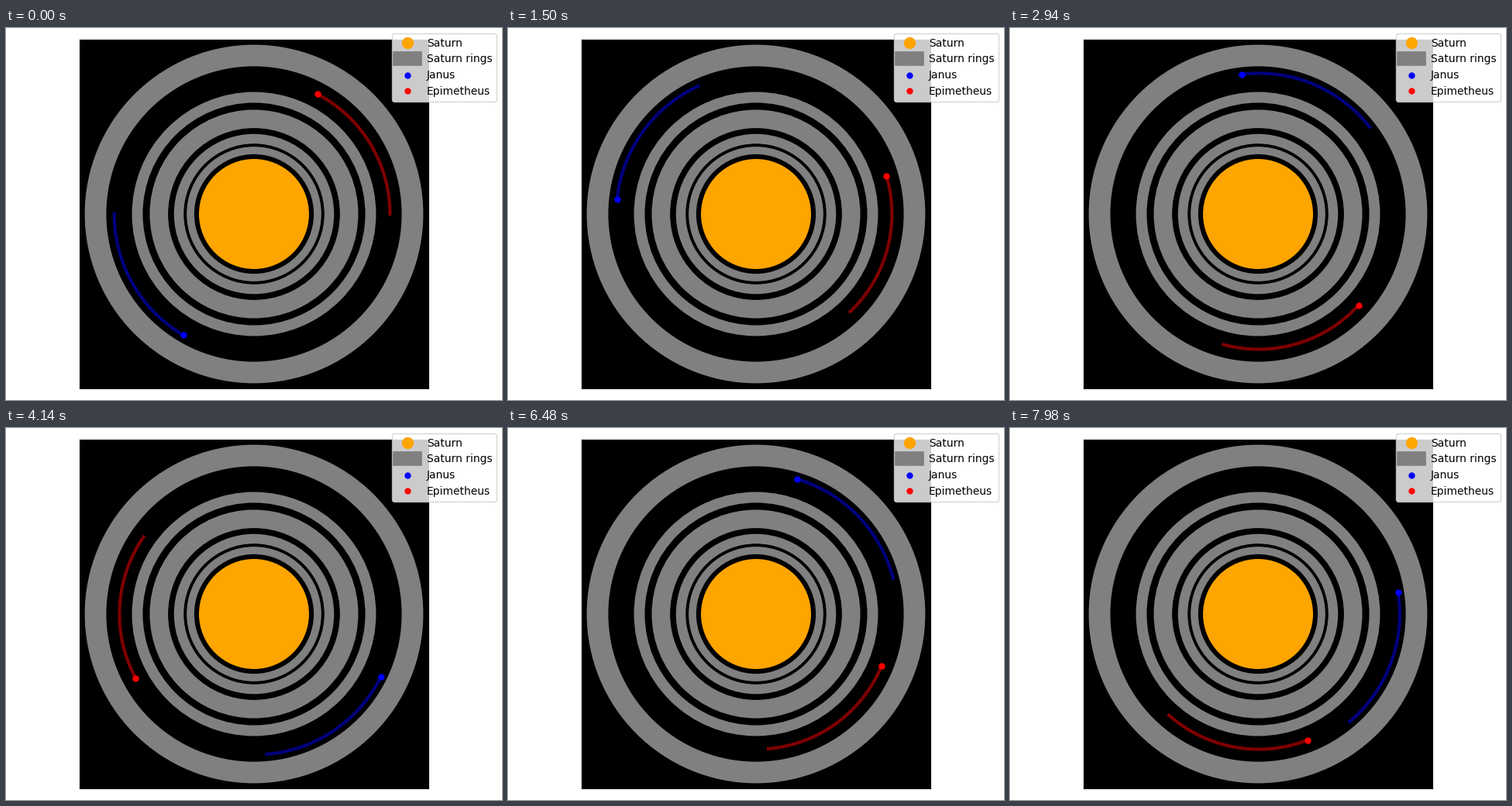
A matplotlib script for the animation above (8 s loop, 640 px wide and 480 px high).

```python
import numpy as np
import matplotlib.pyplot as plt
from matplotlib.animation import FuncAnimation
from matplotlib.lines import Line2D
from matplotlib.patches import Circle

W, H, DPI = 640, 480, 100
TICK, HOLD, LOOP = 20, 3, 8000   # ms per tick, ticks per pose, ms per loop
HALF = 225                       # half the plot's side, in pixels
TRAIL = 5                        # trail length, in poses

# (mid radius in px, line width in pt)
RINGS = [(82, 7), (97, 9), (122.7, 17), (150.5, 10), (204.5, 20)]

fig = plt.figure(figsize=(W / DPI, H / DPI), dpi=DPI)
ax = fig.add_axes([(W / 2 - HALF) / W, (H / 2 - HALF) / H,
                   2 * HALF / W, 2 * HALF / H], facecolor="black")
ax.set(xlim=(-HALF, HALF), ylim=(-HALF, HALF), xticks=[], yticks=[])

rings = [ax.add_patch(Circle((0, 0), r, fill=False, ec="gray", lw=lw))
         for r, lw in RINGS]
ax.add_patch(Circle((0, 0), 71, fc="orange", lw=0, zorder=2))


class Moon:
    """Kepler orbit whose far point lies to the right of the planet."""

    def __init__(self, color, a, ecc, rate, start):
        self.a, self.ecc, self.rate, self.start = a, ecc, rate, start
        self.trail, = ax.plot([], [], color=color, lw=3, alpha=0.5)
        self.dot, = ax.plot([], [], "o", color=color, ms=5, zorder=3)

    def position(self, step):
        mean = np.radians(self.start + self.rate * step) - np.pi
        true = mean + 2 * self.ecc * np.sin(mean)
        r = self.a * (1 - self.ecc ** 2) / (1 + self.ecc * np.cos(true))
        return -r * np.cos(true), -r * np.sin(true)

    def move(self, step):
        x, y = self.position(np.linspace(step - TRAIL, step, 61))
        self.trail.set_data(x, y)
        self.dot.set_data(x[-1:], y[-1:])
        return self.trail, self.dot


janus = Moon("blue", 181.6, 0.0068, 11.803, 180)
epimetheus = Moon("red", 174.5, 0.0052, 12.543, 0)

saturn_key = Line2D([], [], color="orange", marker="o", ms=10, ls="")
fig.legend([saturn_key, rings[0], janus.dot, epimetheus.dot],
           ["Saturn", "Saturn rings", "Janus", "Epimetheus"],
           loc="upper right")


def update(tick):
    step = tick // HOLD + TRAIL
    return *janus.move(step), *epimetheus.move(step)


anim = FuncAnimation(fig, update, frames=LOOP // TICK, interval=TICK,
                     repeat=True, repeat_delay=0)
plt.show()
```
